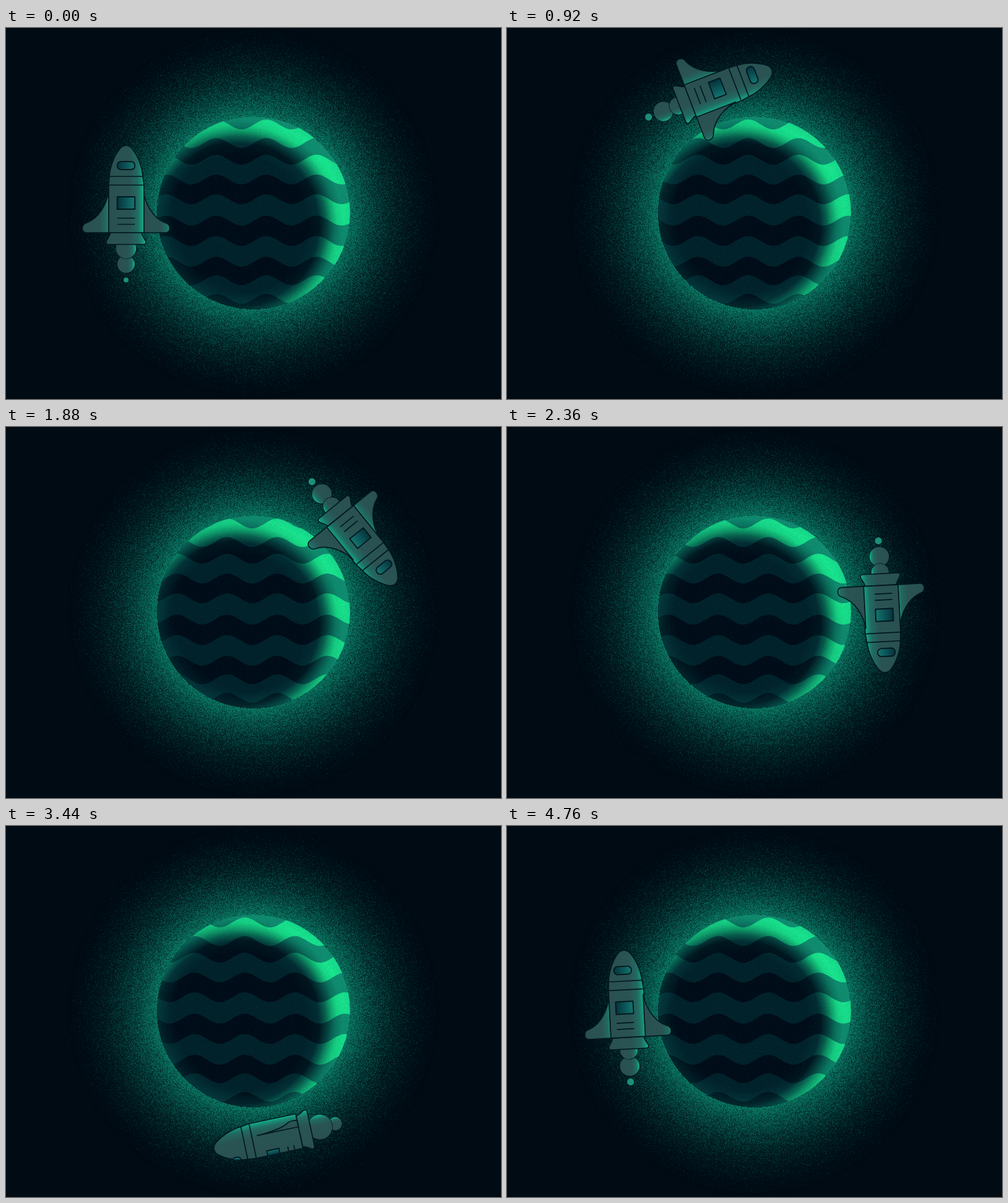
These frames come from a looping animation (800x600 px, 4.8 s). An HTML page with a canvas:

```html
<!DOCTYPE html>
<html lang="en">
<head>
<meta charset="utf-8">
<title>Rocket orbiting a planet</title>
<style>
html, body { margin: 0; width: 100%; height: 100%; overflow: hidden; background: #000b14; }
canvas { display: block; width: 800px; height: 600px; }
</style>
</head>
<body>
<canvas id="stage" width="800" height="600"></canvas>
<script>
const W = 800, H = 600, LOOP = 4800, STEP = 40;
const CX = 400, CY = 299, R = 156;
const AXIS = 194, BODY_R = 28.5, INK = '#021820';
const RAD = Math.PI / 180;
const ctx = document.getElementById('stage').getContext('2d');
const clamp = (v, a, b) => Math.min(b, Math.max(a, v));

function rng(seed) {
  return () => {
    seed = (seed + 0x6D2B79F5) | 0;
    let x = Math.imul(seed ^ (seed >>> 15), 1 | seed);
    x = (x + Math.imul(x ^ (x >>> 7), 61 | x)) ^ x;
    return ((x ^ (x >>> 14)) >>> 0) / 4294967296;
  };
}

function stops(g, list) {
  list.forEach(([at, color]) => g.addColorStop(at, color));
  return g;
}

// Speckled halo outside the disc, faint texture on it
function makeGrain(seed) {
  const layer = document.createElement('canvas');
  layer.width = W;
  layer.height = H;
  const c = layer.getContext('2d');
  const img = c.createImageData(W, H);
  const px = img.data, rand = rng(seed);
  for (let y = 0, i = 0; y < H; y++) {
    for (let x = 0; x < W; x++, i += 4) {
      const r = Math.hypot(x + .5 - CX, y + .5 - CY);
      if (r > 311) continue;
      const n = rand();
      if (r < R) {
        const lit = n > .5;
        px[i] = lit ? 8 : 0;
        px[i + 1] = lit ? 80 : 10;
        px[i + 2] = lit ? 78 : 20;
        px[i + 3] = rand() * 26;
      } else {
        const k = 1 - (r - R) / R, base = .42 * k * k;
        const v = n < .8 * k ** 1.8 ? base + (.2 + .12 * k) * (.7 + .6 * rand()) : base;
        px[i] = 6 + 7 * k;
        px[i + 1] = 118 + 38 * k;
        px[i + 2] = 112 + 12 * k;
        px[i + 3] = 255 * Math.min(1, v);
      }
    }
  }
  c.putImageData(img, 0, 0);
  return layer;
}
const grains = [11, 23, 37, 51].map(makeGrain);

const radial = (x, y, a, b, list) => stops(ctx.createRadialGradient(x, y, a, x, y, b), list);
const darkFill = radial(374, 318, 112, 192, [
  [0, '#000c18'], [.26, '#01161f'], [.42, '#05413f'], [.58, '#0b7660'], [.72, '#109272'], [1, '#159c78']]);
const lightFill = radial(374, 318, 112, 192, [
  [0, '#02222b'], [.24, '#032d34'], [.38, '#08614f'], [.5, '#10a56e'], [.62, '#18e089'], [.76, '#1cfa98'], [1, '#1cfc9a']]);
const rimFill = radial(CX, CY, 128, R, [[0, 'rgba(10,110,100,0)'], [1, 'rgba(10,110,100,.2)']]);

const EDGES = [156, 186, 213, 245, 277, 311.5, 344.5, 378, 408, 438];
const PERIOD = 81;

function wave(y, crest, back) {
  for (let i = 0; i <= 80; i++) {
    const x = 240 + 4 * (back ? 80 - i : i);
    ctx.lineTo(x, y - 8 * Math.cos((x - crest) / PERIOD * 2 * Math.PI));
  }
}

function drawPlanet(t) {
  const crest = 421 - 2 * PERIOD * t / LOOP;
  ctx.save();
  ctx.beginPath();
  ctx.arc(CX, CY, R, 0, 7);
  ctx.clip();
  ctx.fillStyle = darkFill;
  ctx.fillRect(240, 140, 320, 320);
  ctx.fillStyle = lightFill;
  for (let i = 0; i < EDGES.length; i += 2) {
    ctx.beginPath();
    wave(EDGES[i], crest, false);
    wave(EDGES[i + 1], crest, true);
    ctx.fill();
  }
  ctx.fillStyle = rimFill;
  ctx.fillRect(240, 140, 320, 320);
  ctx.restore();
}

function metal(x0, x1) {
  return stops(ctx.createLinearGradient(x0, 0, x1, 0), [
    [0, '#2a5051'], [.6, '#295453'], [.82, '#216a62'], [.94, '#16957a'], [1, '#19b889']]);
}

function paint(path, fill, width = 1.7) {
  ctx.fillStyle = fill;
  ctx.fill(path);
  ctx.strokeStyle = INK;
  ctx.lineWidth = width;
  ctx.stroke(path);
}

const hull = new Path2D('M166 331V254L167 240C168 223 176 206 182 198Q187 190 194 190' +
  'T206 198C212 206 220 223 221 240L223 254V331Z');
const skirt = new Path2D('M169 331H219C221 338 224 341 226 345Q227 350 222 350H166' +
  'Q161 350 162 345C164 341 167 338 169 331Z');

function line(x0, x1, y, width = 1.7) {
  ctx.beginPath();
  ctx.moveTo(x0, y);
  ctx.lineTo(x1, y);
  ctx.strokeStyle = INK;
  ctx.lineWidth = width;
  ctx.stroke();
}

function drawBubbles(t) {
  const phase = (t % 240) / 240;
  for (let i = 3; i >= 0; i--) {
    const y = 331 + 25.5 * (i + phase);
    if (y <= 340) continue;
    const r = y < 366 ? 20 * Math.sqrt((y - 340) / 26) : 20 - (y - 366) * .393;
    if (r < .6) continue;
    ctx.beginPath();
    ctx.arc(AXIS, y, r + .3, 0, 7);
    ctx.strokeStyle = INK;
    ctx.lineWidth = 1.6;
    ctx.stroke();
    ctx.fillStyle = r < 7 ? '#1c8f79' : metal(AXIS - r, AXIS + r);
    ctx.fill();
  }
}

function drawWing(angle) {
  const s = Math.sin(angle * RAD);
  const at = d => AXIS + d * s;
  const p = new Path2D();
  p.moveTo(at(28), 263);
  p.bezierCurveTo(at(31), 286, at(44), 307, at(63), 315);
  p.bezierCurveTo(at(73), 317, at(73), 331, at(64), 331);
  p.lineTo(at(28), 331);
  p.closePath();
  paint(p, metal(Math.min(at(28), at(70)), Math.max(at(28), at(70)) + 4));
}

// Horizontal extent of a marking wrapped round the hull
function wrap(roll) {
  const mid = ((-roll + 540) % 360 + 360) % 360 - 180;
  const a = clamp(mid - 30, -90, 90), b = clamp(mid + 30, -90, 90);
  return a < b ? [a, b].map(v => AXIS + BODY_R * Math.sin(v * RAD)) : null;
}

function drawMarkings(roll) {
  const span = wrap(roll);
  if (!span) return;
  const [a, b] = span, w = b - a;
  const glass = stops(ctx.createLinearGradient(a, 0, b, 0), [
    [0, '#06323b'], [.6, '#0d5a5c'], [1, '#14776e']]);
  const pane = (y, h, r) => {
    const p = new Path2D();
    p.roundRect(a, y, w, h, Math.min(r, w / 2));
    paint(p, glass, 1.9);
  };
  ctx.save();
  ctx.clip(hull);
  pane(216, 13, 6);
  pane(273, 20, 0);
  line(a, b, 307.5);
  line(a, b, 317.5);
  ctx.restore();
}

function rollAt(t) {
  if (t < 2920) return 8 * clamp(t / 400, 0, 1);
  const p = clamp((t - 2920) / 1840, 0, 1);
  return 8 + 180 * (1 - Math.cos(Math.PI * p));
}

function drawRocket(t) {
  const roll = rollAt(t);
  const wings = [90 - roll, -90 - roll];
  const inFront = a => Math.cos(a * RAD) > .001;
  ctx.save();
  ctx.translate(CX, CY);
  ctx.rotate(2 * Math.PI * t / LOOP);
  ctx.translate(-CX, -CY);
  ctx.lineJoin = 'round';
  drawBubbles(t);
  wings.filter(a => !inFront(a)).forEach(drawWing);
  paint(skirt, metal(162, 226));
  paint(hull, metal(166, 223));
  line(167, 221, 240);
  line(166, 222, 254);
  drawMarkings(roll);
  wings.filter(inFront).forEach(drawWing);
  ctx.restore();
}

function draw(ms) {
  const step = Math.floor((ms % LOOP) / STEP), t = step * STEP;
  ctx.fillStyle = '#000b14';
  ctx.fillRect(0, 0, W, H);
  drawPlanet(t);
  ctx.drawImage(grains[step % grains.length], 0, 0);
  drawRocket(t);
}

const start = performance.now();
function tick() {
  draw(performance.now() - start);
  requestAnimationFrame(tick);
}
tick();
</script>
</body>
</html>
```
